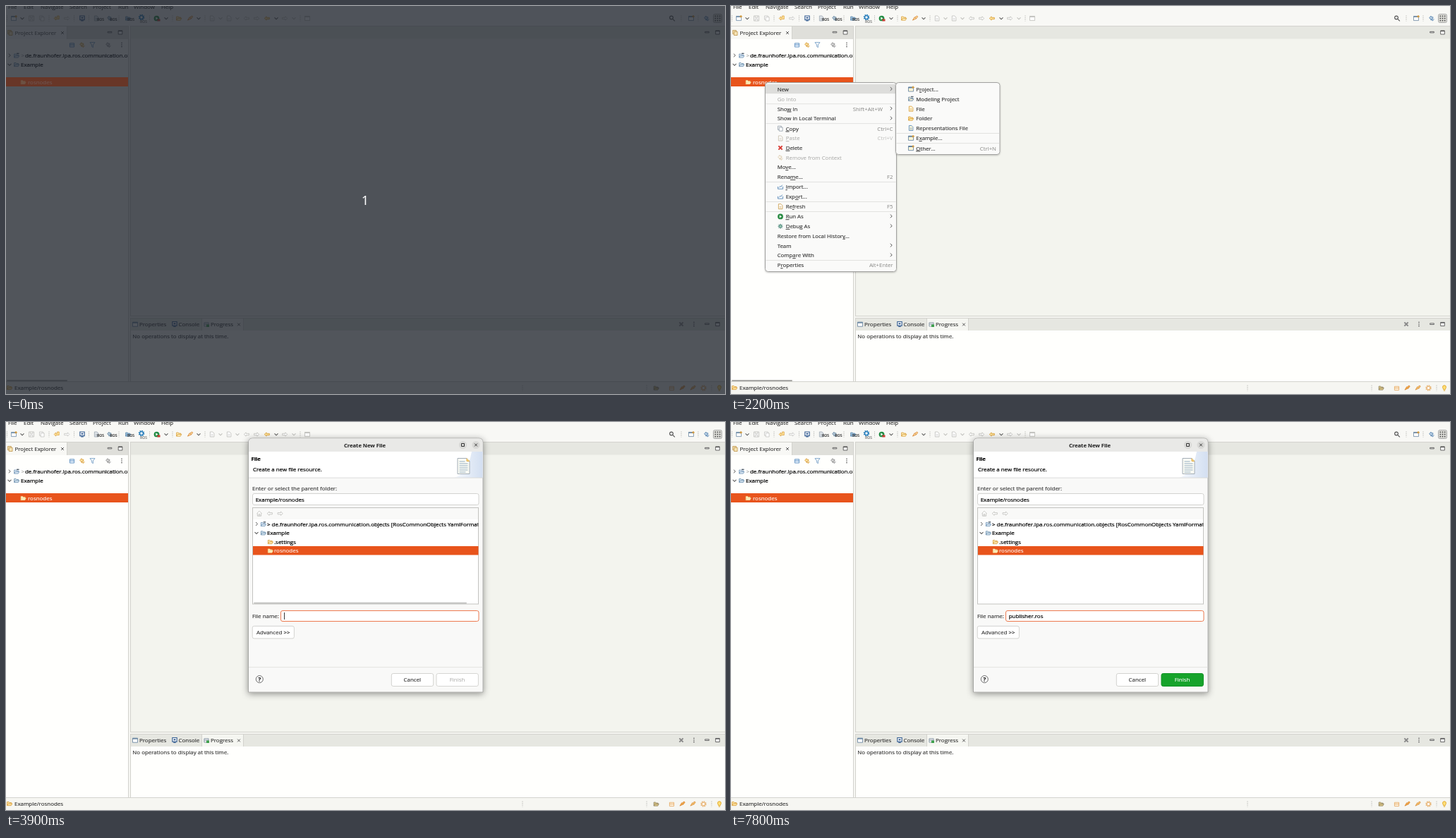
Write an HTML page that moves like this. It is 1019 px wide and 550 px high and loops after 8 s.

```html
<!DOCTYPE html>
<html lang="en">
<head>
<meta charset="utf-8">
<title>Create New File</title>
<style>
html, body { margin: 0; width: 100%; height: 100%; overflow: hidden; background: #f6f6f3; }
svg { display: block; width: 1019px; height: 550px; font: 7.95px "Open Sans", "Noto Sans", sans-serif; }
text { fill: #2b2b2b; stroke: #2b2b2b; stroke-width: .12; white-space: pre; }
.ink { fill: #000; stroke: #000; stroke-width: .22; }
.dim { fill: #a5a5a3; stroke: none; }
.key { fill: #858583; stroke: none; }
.light { fill: #fff; stroke: #fff; }
.bold { font-weight: 700; font-size: 7.6px; }
#menu text, #submenu text { font-size: 7.8px; }
.mnemonics .m { text-decoration: underline; }
</style>
</head>
<body>
<svg id="stage" viewBox="0 0 1019 550" xmlns="http://www.w3.org/2000/svg"></svg>
<script>
const ORANGE = '#e8541c', GREY = '#bdbdba', BLUE = '#4c82ba', GOLD = '#d79a35', DARK = '#555';

const rect = (x, y, w, h, fill, extra = '') =>
  `<rect x="${x}" y="${y}" width="${w}" height="${h}" fill="${fill}" ${extra}/>`;
const path = (d, stroke, fill = 'none', width = 1) =>
  `<path d="${d}" stroke="${stroke}" fill="${fill}" stroke-width="${width}"/>`;
const dot = (x, y, r, fill, extra = '') => `<circle cx="${x}" cy="${y}" r="${r}" fill="${fill}" ${extra}/>`;
// y is the middle of the line of text
const text = (x, y, s, cls = '', extra = '') =>
  `<text x="${x}" y="${y + 2.9}" class="${cls}" ${extra}>${s}</text>`;
const group = (id, body, extra = '') => `<g id="${id}" ${extra}>${body}</g>`;
const END = 'text-anchor="end"', MID = 'text-anchor="middle"';

// Small pictures around the origin, in a stroke colour c and a fill colour f
const glyphs = {
  folder: (c, f) => path('M-3.8 3V-2.8h2.8l1 1.2h3v1.5M-3.8 3l1.7-3.1h6.4L2.6 3z', c, f, .9),
  project: (c, f) => glyphs.folder(c, f) + path('M0-3.6h4', '#53606d', 'none', 1.6),
  window: (c, f) => path('M-4-3.5h8v7h-8z', c, f, .9) + path('M-4-2.6h8', c, 'none', 1.6),
  fresh: (c, f) => glyphs.window(c, f) + path('M3.5-5v4M1.5-3h4', GOLD, 'none', 1.3),
  doc: (c, f) => path('M-3-4h4l2.3 2.3V4H-3z', c, f, .9) + path('M-1.5 0h3M-1.5 2h3', c, 'none', .7),
  docs: (c, f) => path('M-4-4h5.5v6H-4z', c, f, .8) + path('M-2-2h5.5v6H-2z', c, f, .8),
  save: (c, f) => path('M-4-4h8v8h-8zM-2-4v3h4v-3M-2 4V1h4v3', c, f, .9),
  left: (c, f) => path('M-4.3 0L-1-3v1.7h4.8v2.6H-1V3z', c, f, .9),
  right: (c, f) => path('M4.3 0L1-3v1.7h-4.8v2.6H1V3z', c, f, .9),
  undo: (c, f) => path('M-4.3 0L-1.5-3v1.8h2.2V-4h3v5.2h-5.2V3z', c, f, .8),
  redo: (c, f) => path('M4.3 0L1.5-3v1.8H-3.8v2.5h5.3V3z', c, f, .8),
  screen: (c, f) => path('M-3.6-4h7.2v6.4h-7.2zM-2 4h4', c, f, 1.3) + rect(-1.5, -2, 3, 2.3, c),
  torch: (c, f) => path('M-4 3l3-5 3 2.3zM0-2l3-2 1.2 1.3L2 .3', c, f, .9),
  box: (c, f) => path('M-3.5-2.5h7v6h-7zM-3.5 0h7', c, f, .9),
  cross: c => path('M-3-3l6 6M3-3l-6 6', c, 'none', 2.2),
  close: c => path('M-2.2-2.2l4.4 4.4M2.2-2.2l-4.4 4.4', c, 'none', 1.1),
  chevron: c => path('M-1.4-2.7L1.4 0l-2.8 2.7', c, 'none', 1.1),
  down: c => path('M-2.8-1.3L0 1.5l2.8-2.8', c, 'none', 1.2),
  more: c => dot(0, -3, .9, c) + dot(0, 0, .9, c) + dot(0, 3, .9, c),
  min: c => path('M-3.2-1.3h6.4v1.8h-6.4z', c, '#fff', 1),
  max: c => path('M-3.2-2.9h6.4v5.8h-6.4z', c, '#fff', 1) + path('M-3.2-2.3h6.4', c, 'none', 1.5),
  filter: (c, f) => path('M-4-3.8h8L1 0v4.2L-1 2.8V0z', c, f, .9),
  links: (c, f) => path('M-3.8-1L-1-3.7v1.6h3v3h-3v1.3zM4 1.5L1.3 4V2.6h-3', c, f, 1),
  import: (c, f) => path('M-4-.5V3.3h8V-.5M-2.4 1.5L-.5-1l1.6 1L3-3', c, f, 1),
  home: (c, f) => path('M-4 0L0-4l4 4M-3-.5V4h6V-.5M-1 4V1h2v3', c, f, .9),
  play: (c, f) => dot(0, 0, 4.4, c) + path('M-1.2-2L2 0l-3.2 2z', f, f, .4),
  bug: (c, f) => path('M-4 0h8M-3-3l6 6M3-3l-6 6M0-4v8', c, 'none', .9) + dot(0, 0, 2.4, f, `stroke="${c}"`),
  find: c => path('M1 1l3.4 3.4M1.6-1.2a2.7 2.7 0 1 1-5.4 0a2.7 2.7 0 1 1 5.4 0', c, 'none', 1.3),
  gear: c => `<circle r="3.6" fill="none" stroke="${c}" stroke-width="2.4" stroke-dasharray="1.7 1.1"/>` +
    `<circle r="2.6" fill="#fff" stroke="${c}" stroke-width="1.3"/>`,
  dots: c => [-3.6, 0, 3.6].map(x => [-3.6, 0, 3.6].map(y => rect(x - .9, y - .9, 1.8, 1.8, c)).join('')).join(''),
  bulb: (c, f) => path('M-1.3 2.6C-1.3 1-2.8.5-2.8-1.4a2.8 2.8 0 0 1 5.6 0C2.8.5 1.3 1 1.3 2.6zM-1.3 4.2h2.6', c, f, 1)
};
const icon = (name, x, y, c = DARK, f = '#fff') =>
  `<g transform="translate(${x} ${y}) scale(.88)">${glyphs[name](c, f)}</g>`;
const grip = (x, y) => `<path d="M${x} ${y - 4}v8" stroke="#b3b3af" stroke-dasharray="1.2 1.3"/>`;
const row = (y, list) => list.map(([name, x, c, f]) => icon(name, x, y, c, f)).join('');

function toolbar() {
  const names = [['File', 3], ['Edit', 25], ['Navigate', 49], ['Search', 90], ['Project', 123],
    ['Run', 159], ['Window', 181], ['Help', 220]];
  const ros = (x, y) => `<text x="${x}" y="${y}" style="font-size:5px;font-weight:600">ROS</text>`;
  return names.map(([s, x]) => text(x, 1.2, s)).join('') +
    [1.5, 61, 96.5, 117.5, 160, 203.5, 236, 282, 417, 957, 981].map(x => grip(x, 17.5)).join('') +
    [23, 227, 273, 383].map(x => icon('down', x, 17.5)).join('') +
    [304, 328, 408].map(x => icon('down', x, 17.5, GREY)).join('') +
    row(17.5, [['fresh', 11, '#6d8ba8'], ['save', 36, GREY], ['docs', 51, GREY], ['undo', 72, GOLD, '#ffe39a'],
      ['redo', 86, GREY], ['screen', 108, '#345d92'], ['doc', 128, '#9aa6b1', '#dfe4e8'],
      ['links', 147, '#6d8ca6', '#b7cad8'], ['folder', 173, '#5585ad', '#a9c8df'],
      ['play', 213.5, '#208b42', '#fff'], ['folder', 245, GOLD, '#fff0bd'], ['torch', 261, '#d27d2c', '#ffe0a0'],
      ['doc', 292, GREY], ['doc', 316, GREY], ['left', 341, GREY], ['right', 355, GREY],
      ['left', 370, GOLD, '#ffe69e'], ['right', 395, GREY], ['window', 427, GREY],
      ['find', 944, DARK], ['fresh', 971, '#6b86a0'], ['links', 993, '#5280ae', '#c9dced']]) +
    icon('gear', 192, 16, '#1673b6') +
    ros(129, 20.5) + ros(147.5, 20.5) + ros(172, 20.5) + `<g opacity=".6">${ros(190, 24)}</g>` +
    rect(214.5, 18.5, 4, 3, '#c93b32') +
    rect(1002.5, 11.5, 12, 12, '#deded9', 'rx="2" stroke="#aaa"') + icon('dots', 1008.5, 17.5, '#444');
}

function workbench() {
  const line = (x, y, w, h) => rect(x, y, w, h, '#d3d3ce');
  return rect(0, 0, 1019, 550, '#f6f6f2') + rect(0, 0, 1019, 28, '#f8f8f5') + toolbar() +
    rect(0, 28, 173, 504, '#fffffd') + rect(86, 28, 87, 19, '#dfdfda') + rect(0, 28, 86, 19, '#f8f8f5') +
    line(0, 28, 173, 1) + line(86, 28, 1, 19) + line(173, 28, 1, 504) +
    rect(176, 28, 843, 412, '#f3f4ee') + rect(176, 28, 843, 18.5, '#e6e7e1') +
    line(176, 28, 843, 1) + line(176, 28, 1, 412) + line(176, 439, 843, 1) +
    rect(176, 442, 843, 90, '#fffffd') + rect(176, 442, 843, 18, '#e6e7e1') + rect(278, 442, 59, 18, '#f5f6f1') +
    line(176, 442, 843, 1) + line(176, 442, 1, 90) + line(277, 442, 1, 18) + line(336, 442, 1, 18) +
    line(0, 532, 1019, 1) +
    icon('docs', 6, 38, '#b78a3c', '#f6e4b5') + text(12.5, 37.7, 'Project Explorer', '', 'id="tabTitle"') +
    icon('close', 80, 38) +
    row(37.5, [['min', 147], ['max', 162], ['min', 993.5], ['max', 1008.5]]) +
    row(55, [['box', 93.5, BLUE, '#e5f0fb'], ['links', 108, GOLD, '#ffe7a8'], ['filter', 122.5, '#6190bd'],
      ['links', 145, '#8b8b8b', '#ddd'], ['more', 164]]) +
    icon('chevron', 5, 70) + icon('project', 15, 70.5, '#6d91b3', '#dceaf5') +
    `<svg width="172.5" height="550">${text(21.5, 70, '&gt;', 'key') + text(27, 70, 'de.fraunhofer.ipa.ros.communication.objects', 'ink')}</svg>` +
    icon('down', 5, 83) + icon('folder', 15, 83, '#6388a8', '#d9e8f2') + text(21, 82.8, 'Example', 'ink') +
    rect(0, 101, 173, 13, ORANGE) + icon('folder', 24.5, 108, '#f3d48c', '#fff2c7') +
    text(31, 107.7, 'rosnodes', 'light') + rect(1, 530, 86, 2, '#a9a9a6', 'id="sideBar" rx="1"') +
    icon('window', 183, 451.2, '#5f7d9b') + text(189, 451, 'Properties') +
    icon('screen', 239, 451, '#365f91') + text(244.5, 451, 'Console') +
    icon('box', 284, 451, '#7c8c9e', '#eee') + rect(284, 451.5, 4, 3.5, '#3fa14c') +
    text(290, 451, 'Progress') + icon('close', 330, 451.5) +
    row(451, [['cross', 957, '#888'], ['more', 975], ['min', 993.5], ['max', 1008.5]]) +
    text(179.3, 467.7, 'No operations to display at this time.') +
    icon('folder', 5, 541, GOLD, '#ffe6a6') + text(12, 540.7, 'Example/rosnodes') +
    [732, 908, 1000].map(x => grip(x, 541.5)).join('') +
    row(541.5, [['folder', 921.5, '#8a8067', '#dfc780'], ['box', 943.5, '#e5a65c', '#fdf0dc'],
      ['torch', 958.5, '#d98430', '#f2ab49'], ['torch', 973.5, '#d79040', '#f9c36c'],
      ['gear', 988.5, '#e8b473'], ['bulb', 1011, '#e0a11c', '#ffe07a']]);
}

// Puts the letter after & in a span that can be underlined
const mnemonic = s => s.replace(/&(.)/, '<tspan class="m">$1</tspan>');

function popup(x, y, w, h, separators) {
  return rect(x, y, w, h, '#fafaf9', 'rx="4" stroke="#a2a2a0" filter="url(#soft)"') +
    separators.map(sy => rect(x + 1, sy, w - 2, .8, '#dcdcda')).join('');
}

function contextMenu() {
  const items = [
    [118, 'New', '>'], [131.7, 'Go Into', '', 1], [145.7, 'Sho&w In', 'Shift+Alt+W>'], [159.5, 'Show in Local Terminal', '>'],
    [173.7, '&Copy', 'Ctrl+C', 0, 'docs', '#83909d'], [187.5, '&Paste', 'Ctrl+V', 1, 'doc', '#c3bba8'],
    [201, '&Delete', '', 0, 'cross', '#d93830'], [214.8, 'Remove from Context', '', 1, 'links', '#d9c7a5'],
    [228.4, 'Mo&ve...', ''], [242.2, 'Rena&me...', 'F2'], [256.4, '&Import...', '', 0, 'import', '#5486b5'],
    [270.2, 'Exp&ort...', '', 0, 'import', '#5486b5'], [284.2, 'Re&fresh', 'F5', 0, 'doc', '#c8963e'],
    [298.4, '&Run As', '>', 0, 'play', '#288b43'], [312.2, '&Debug As', '>', 0, 'bug', '#3d7d72', '#9fc8b3'],
    [326, 'Restore from Local Histor&y...', ''], [339.7, 'Team', '>'], [353.4, 'Comp&are With', '>'],
    [367.5, 'P&roperties', 'Alt+Enter']];
  return popup(48.5, 108.5, 186, 268, [138.4, 166.3, 249, 277, 291.2, 360.2]) +
    rect(49, 110.8, 185, 13.4, '#dddddb', 'id="newRow"') +
    items.map(([y, label, side, off, pic, c, f]) => {
      const arrow = side.endsWith('>'), keys = side.replace('>', '');
      return (pic ? icon(pic, 70, y, c, f) : '') + text(pic ? 77.7 : 65.7, y, mnemonic(label), off ? 'dim' : '') +
        (arrow ? icon('chevron', 227, y - .5) : '') +
        text(arrow ? 215 : 229.5, y, keys, off ? 'dim' : 'key', END + (off ? ' opacity=".7"' : ''));
    }).join('');
}

function newMenu() {
  const items = [[118, 'P&roject...', 'fresh'], [131.7, 'Modeling Project', 'project'], [145.7, 'File', 'doc', GOLD],
    [159.5, 'Folder', 'folder', GOLD, '#ffe7a0'], [173, 'Representations File', 'doc', BLUE],
    [187.3, 'E&xample...', 'fresh'], [201.6, '&Other...', 'fresh']];
  return popup(233.5, 108.5, 147.5, 102, [180, 194.3]) +
    rect(234, 0, 146.5, 13.6, '#dddddb', 'id="hover"') +
    items.map(([y, label, pic, c = '#587a9c', f = '#fff6d8']) =>
      icon(pic, 255, y, c, f) + text(262.3, y, mnemonic(label))).join('') +
    text(376, 201.6, 'Ctrl+N', 'key', END);
}

function dialog() {
  const field = (x, y, w, h, stroke, extra = '') => rect(x, y, w, h, '#fff', `rx="2.5" stroke="${stroke}" ${extra}`);
  return `<path d="M343.5 383V29q0-6 6-6h320.5q6 0 6 6v354z" fill="#f9f9f8" stroke="#9a9a98" stroke-width=".8" filter="url(#shadow)"/>` +
    path('M344 42V29q0-5.6 5.6-5.6h320.3q5.6 0 5.6 5.6v13z', 'none', '#e9e9e7') +
    text(508.5, 32.7, 'Create New File', 'bold', MID) +
    dot(647.5, 32.5, 5.6, '#d9d9d7') + path('M645.5 30.5h4v4h-4z', '#333') +
    dot(666, 32.5, 5.6, '#d9d9d7') + icon('close', 666, 32.5, '#333') +
    rect(344, 42, 331.6, 37, '#fff') + path('M675.6 42v37H634q20-4 26-37z', 'none', 'url(#banner)') +
    rect(344, 78.7, 331.6, .8, '#d5d5d3') +
    text(347.5, 52, 'File', 'bold ink') + text(350, 67, 'Create a new file resource.', 'ink') +
    path('M640 51.5h13l4 4v18h-17z', '#a3adb6', '#fbfcf5') + path('M653 51.5v4h4', '#d9a957', '#ffd976') +
    path('M642.5 56h8M642.5 59h12M642.5 62h12M642.5 65h12M642.5 68h12M642.5 71h9', '#8aa3bc', 'none', .9) +
    text(349, 94.3, 'Enter or select the parent folder:') +
    field(349.5, 101.5, 320.5, 16, '#d3d3d0') + text(353.7, 109.7, 'Example/rosnodes', 'ink') +
    rect(349.5, 121.5, 320, 136.5, '#fff', 'stroke="#c3c3c0"') + rect(350, 122, 319, 16, '#f9f9f8') +
    row(129.7, [['home', 359, GREY], ['left', 374, GREY], ['right', 388.5, GREY]]) +
    icon('chevron', 355.3, 144.5) + icon('project', 364.7, 145, '#6d91b3', '#dceaf5') +
    `<svg width="669.3" height="550">` +
    text(370, 144.7, 'de.fraunhofer.ipa.ros.communication.objects', 'ink', 'id="plainName"') +
    text(370, 144.7, '&gt; de.fraunhofer.ipa.ros.communication.objects [RosCommonObjects YamlFormat', 'ink', 'id="fullName"') + '</svg>' +
    icon('down', 355, 157.3) + icon('folder', 364.7, 157.3, '#6388a8', '#d9e8f2') + text(370, 157.2, 'Example', 'ink') +
    icon('folder', 374.7, 170, GOLD, '#ffebb5') + text(380, 169.8, '.settings', 'ink') +
    rect(350, 176, 319.5, 12.5, ORANGE) + icon('folder', 374.7, 182.5, '#f3d48c', '#fff2c7') +
    text(380, 182.3, 'rosnodes', 'light') +
    rect(351, 255.7, 302, 1.7, '#9b9b98', 'id="treeBar" rx=".8"') +
    text(349, 275, 'File name:') + field(389.5, 267.5, 280.5, 15, '#ee8d6b', 'id="nameField"') +
    text(393.7, 275, '', 'ink', 'id="fileName"') + rect(394, 270, .9, 10, '#222', 'id="caret"') +
    field(349.2, 289.3, 59.2, 17.6, '#d3d3d0') + text(378.8, 298.2, 'Advanced &gt;&gt;', '', MID) +
    rect(344, 347.3, 331.6, .8, '#dededb') +
    dot(359.3, 364.6, 5, '#fff', 'stroke="#666"') + text(359.3, 364.9, '?', 'bold', MID + ' style="font-size:8.5px"') +
    field(546.3, 356.5, 59.4, 18, '#d3d3d0') + text(575.8, 365.5, 'Cancel', '', MID) +
    field(610, 356.5, 59.4, 18, '#d6d6d3') + text(639.5, 365.5, 'Finish', 'dim', MID) +
    group('ready', rect(610, 356.5, 59.4, 18, '#16a32b', 'rx="2.5" stroke="#139527"') +
      text(639.5, 365.5, 'Finish', 'light', MID));
}

document.getElementById('stage').innerHTML = `<defs>
  <linearGradient id="banner"><stop offset="0" stop-color="#f6f9fd"/><stop offset="1" stop-color="#d3dff1"/></linearGradient>
  <filter id="soft" x="-10%" y="-10%" width="120%" height="120%"><feDropShadow dx="0" dy="1" stdDeviation="1.2" flood-opacity=".22"/></filter>
  <filter id="shadow" x="-10%" y="-10%" width="120%" height="120%"><feDropShadow dx="0" dy="2" stdDeviation="5" flood-opacity=".42"/></filter>
  </defs>` +
  workbench() + group('menu', contextMenu()) + group('submenu', newMenu(), 'class="mnemonics"') + group('dialog', dialog()) +
  group('countdown', rect(0, 0, 1019, 550, '#21262f', 'opacity=".78"') + rect(0, 101, 173, 13, ORANGE, 'opacity=".18"') +
    `<text x="509" y="281.5" class="light" ${MID} style="font-size:17.5px">1</text>`);

const el = {};
document.querySelectorAll('#stage [id]').forEach(node => el[node.id] = node);
const show = (node, on) => node.setAttribute('display', on ? 'inline' : 'none');
const fade = (node, value) => node.setAttribute('opacity', value);

// Value of the last [time, value] step that has begun
const at = (steps, t) => steps.reduce((value, [start, next]) => t >= start ? next : value, steps[0][1]);

const NAME = 'publisher.ros';
const KEY_TIMES = [5100, 5300, 5500, 5700, 5800, 5900, 6000, 6200, 6300, 7100, 7300, 7400, 7600];
const CARET = [[0, 1], [4100, 0], [4700, 1], [6700, 0], [7100, 1], [7800, 0]];
const READY = [[0, 0], [5100, .45], [5200, .78], [5300, .93], [5400, .98], [5500, 1]];
const TITLE = [[0, '#555'], [400, '#4b4b4b'], [500, '#424242'], [600, '#363636'], [700, '#2b2b2b']];
const BAR_IN = [[0, 0], [3800, .35], [3900, .65], [4100, .85], [4200, 1]];

function draw(time) {
  const t = Math.floor(time % 8000 / 100) * 100;
  show(el.countdown, t < 100);
  el.tabTitle.style.fill = at(TITLE, t);

  show(el.menu, t >= 1600 && t < 3200);
  el.menu.setAttribute('class', t < 2600 ? 'mnemonics' : '');
  show(el.newRow, t >= 1900);
  show(el.submenu, t >= 2200 && t < 3200);
  show(el.hover, t >= 2600);
  el.hover.setAttribute('y', t < 2900 ? 110.8 : 138.7);

  const open = t >= 3400, scale = at([[0, .98], [3500, .996], [3600, 1]], t);
  show(el.dialog, open);
  fade(el.dialog, at([[0, .97], [3500, 1]], t));
  el.dialog.setAttribute('transform', `translate(509.5 391) scale(${scale}) translate(-509.5 -391)`);
  fade(el.sideBar, at([[0, 1], [3500, .5], [3600, 0]], t));
  show(el.plainName, t < 3500);
  show(el.fullName, t >= 3500);
  el.nameField.setAttribute('stroke', t < 3500 ? '#efad91' : '#ec7a50');

  fade(el.treeBar, t < 5700 ? at(BAR_IN, t) : Math.max(0, (6300 - t) / 700));
  el.fileName.textContent = NAME.slice(0, KEY_TIMES.filter(k => t >= k).length);
  show(el.caret, at(CARET, t));
  el.caret.setAttribute('x', 394 + (open ? el.fileName.getComputedTextLength() : 0));
  fade(el.ready, at(READY, t));
}

const begin = performance.now();
function tick() {
  draw(performance.now() - begin);
  requestAnimationFrame(tick);
}
tick();
</script>
</body>
</html>
```
